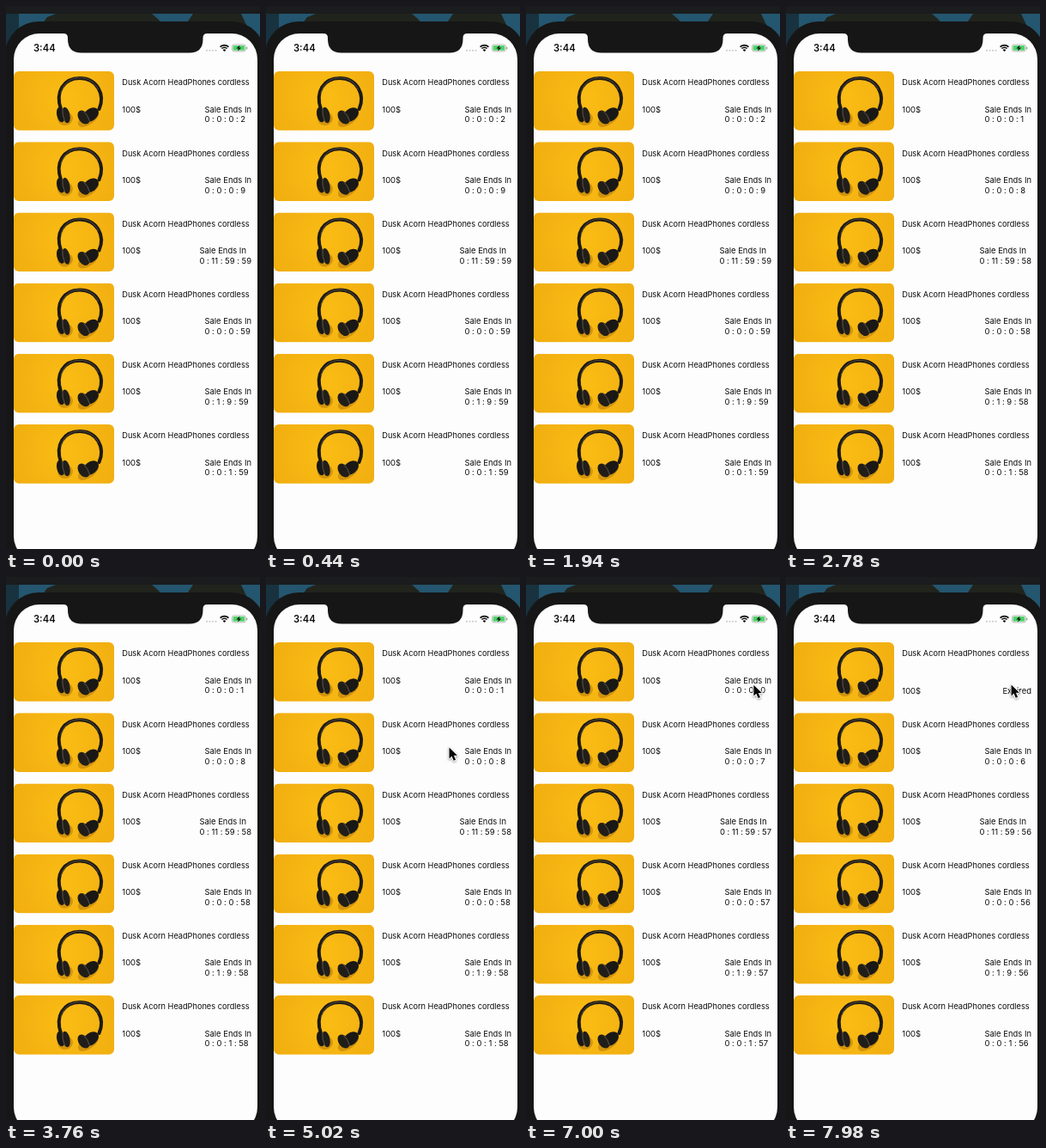
An HTML page with a canvas for the animation above (8 s loop, 296 px wide and 632 px high).

```html
<!DOCTYPE html>
<html lang="en">
<head>
<meta charset="utf-8">
<title>Sale countdown</title>
<style>
  html, body { margin: 0; width: 100%; height: 100%; overflow: hidden; background: #161616; }
  canvas { display: block; width: 296px; height: 632px; }
</style>
</head>
<body>
<canvas id="stage"></canvas>
<script>
const W = 296, H = 632, LOOP = 8000;
const FIRST_TICK = 2560, TICK = 2600;
const ROW_TOP = 76, ROW_STEP = 82.2, RIGHT = 286;
const INK = '#0c0c0c', BEZEL = '#161616', PAPER = '#fdfdfd';
const FAMILY = 'Inter, "Liberation Sans", sans-serif';
const TITLE_FONT = `9.2px ${FAMILY}`, FONT = `9.45px ${FAMILY}`;
const startSeconds = [2, 9, 11 * 3600 + 3599, 59, 4199, 119];

// Pointer path: time, x, y of the tip
const pointer = [
  [3820, -12, 300], [4080, 184, 233], [4480, 222, 205], [4800, 213, 198],
  [5060, 213, 198], [5400, 232, 179], [5760, 270, 137], [6000, 275, 129],
  [6300, 277, 127], [6640, 268, 126], [7100, 264, 125], [8000, 262, 125]
];

const canvas = document.getElementById('stage');
const ctx = canvas.getContext('2d');
const dpr = window.devicePixelRatio || 1;
canvas.width = W * dpr;
canvas.height = H * dpr;

function fillRect(x, y, w, h, color) {
  ctx.fillStyle = color;
  ctx.fillRect(x, y, w, h);
}

function fillRound(x, y, w, h, r, color) {
  ctx.beginPath();
  ctx.roundRect(x, y, w, h, r);
  ctx.fillStyle = color;
  ctx.fill();
}

function fillEllipse(x, y, rx, ry, degrees, color) {
  ctx.beginPath();
  ctx.ellipse(x, y, rx, ry, degrees * Math.PI / 180, 0, Math.PI * 2);
  ctx.fillStyle = color;
  ctx.fill();
}

function fillPath(d, color) {
  ctx.fillStyle = color;
  ctx.fill(new Path2D(d));
}

function strokePath(d, width, color) {
  ctx.lineWidth = width;
  ctx.strokeStyle = color;
  ctx.stroke(new Path2D(d));
}

function text(str, x, y, font = FONT) {
  ctx.font = font;
  ctx.fillStyle = INK;
  ctx.fillText(str, x, y);
}

function drawDesktop() {
  fillRect(0, 0, W, H, '#24566f');
  fillRect(0, 9, 15, 40, '#18323f');
  fillPath('M40 24 L48 13 L58 9 H170 L178 16 L184 24 Z', '#20241d');
  fillPath('M208 24 L218 9 H274 L281 24 Z', '#20241d');
  fillRect(0, 0, W, 9, '#1a1c1d');
}

function drawPhone() {
  fillRound(-1, 18, 303, 660, 39, BEZEL);
  fillRound(9, 32, 284, 615, 30, PAPER);
  fillPath('M67 31.5 V32 Q72 32 72 37 V38.5 Q72 54.5 88 54.5 H213.5 Q229.5 54.5 229.5 38.5 V37 Q229.5 32 234.5 32 V31.5 Z', BEZEL);
}

function drawStatus() {
  text('3:44', 32, 53, `600 11.2px ${FAMILY}`);
  for (let i = 0; i < 4; i++) fillEllipse(234 + i * 3.5, 51.8, 1, 1, 0, '#c8c8c8');

  ctx.lineCap = 'butt';
  ctx.strokeStyle = INK;
  ctx.lineWidth = 1.6;
  for (const r of [7, 4.4]) {
    ctx.beginPath();
    ctx.arc(254.5, 52.6, r, -Math.PI * 0.75, -Math.PI * 0.25);
    ctx.stroke();
  }
  ctx.beginPath();
  ctx.moveTo(254.5, 53);
  ctx.arc(254.5, 53, 2.6, -Math.PI * 0.75, -Math.PI * 0.25);
  ctx.fillStyle = INK;
  ctx.fill();

  ctx.beginPath();
  ctx.roundRect(263.4, 44.9, 16, 8, 2.4);
  ctx.lineWidth = 0.7;
  ctx.strokeStyle = '#9c9c9c';
  ctx.stroke();
  fillRound(264.5, 46, 13.8, 5.8, 1.4, '#4fd36a');
  fillRound(280.2, 47.4, 1.2, 3, 0.6, '#9c9c9c');
  fillPath('M272.6 45.4 L268.3 49.4 H271 L269.9 52.6 L274.3 48.4 H271.6 Z', INK);
}

function drawPhoto(y) {
  ctx.save();
  ctx.translate(9, y);
  ctx.beginPath();
  ctx.roundRect(0, 0, 117, 68.7, 6);
  ctx.clip();
  const glow = ctx.createRadialGradient(60, 32, 8, 60, 32, 72);
  glow.addColorStop(0, '#fabb14');
  glow.addColorStop(1, '#f0ad10');
  fillRect(0, 0, 117, 69, glow);

  fillEllipse(60, 55, 9, 8, -12, 'rgba(140,85,0,.35)');
  fillEllipse(87, 55, 14, 7, -35, 'rgba(140,85,0,.35)');
  ctx.lineCap = 'round';
  strokePath('M55 44 C48 24 58 8 77 8 C97 8 107 27 99.5 44', 4, '#1d1913');
  strokePath('M55 25 C58 14 66 7.6 77 7.6 C87 7.6 95 13 98.5 21', 0.9, '#5c5242');

  // left cup: shell and cushion
  fillEllipse(54.8, 50.5, 4.6, 9, -12, '#1a1815');
  fillEllipse(61, 51, 4.4, 9.5, -12, '#211e1a');
  strokePath('M56.8 43.5 Q56.2 51 59.4 58', 0.8, '#6a6356');

  // right cup
  fillEllipse(90, 50.5, 10, 7, -38, '#1a1815');
  fillEllipse(81.5, 53.5, 6, 8.8, -35, '#211e1a');
  strokePath('M81.5 46.5 Q86.5 51 88.5 58', 0.8, '#6a6356');
  ctx.restore();
}

function clock(s) {
  const parts = [Math.floor(s / 86400), Math.floor(s / 3600) % 24, Math.floor(s / 60) % 60, s % 60];
  return parts.join(' : ');
}

function drawRow(index, ticks) {
  const y = ROW_TOP + index * ROW_STEP;
  const left = startSeconds[index] - ticks;
  const lines = left < 0 ? ['Expired'] : ['Sale Ends In', clock(left)];
  const base = y + (left < 0 ? 59.5 : 47.5);

  drawPhoto(y);
  text('Dusk Acorn HeadPhones cordless', 135.3, y + 16.4, TITLE_FONT);
  text('100$', 135.3, base);
  const x = RIGHT - Math.max(...lines.map(line => ctx.measureText(line).width));
  lines.forEach((line, i) => text(line, x, base + i * 11.8));
}

function drawPointer(t) {
  const next = pointer.findIndex(p => p[0] > t);
  if (next < 1) return;
  const [t0, x0, y0] = pointer[next - 1];
  const [t1, x1, y1] = pointer[next];
  const k = (t - t0) / (t1 - t0);
  ctx.save();
  ctx.translate(x0 + (x1 - x0) * k, y0 + (y1 - y0) * k);
  const arrow = new Path2D('M0.5 0.5 V13.4 L3.5 10.6 L5.7 15.8 L8.1 14.8 L5.9 9.7 H10 Z');
  ctx.lineJoin = 'round';
  ctx.lineWidth = 2;
  ctx.strokeStyle = '#fff';
  ctx.shadowColor = 'rgba(0,0,0,.4)';
  ctx.shadowBlur = 2.5 * dpr;
  ctx.shadowOffsetY = dpr;
  ctx.stroke(arrow);
  ctx.shadowColor = 'transparent';
  ctx.fillStyle = '#060606';
  ctx.fill(arrow);
  ctx.restore();
}

function draw(t) {
  const ticks = t < FIRST_TICK ? 0 : 1 + Math.floor((t - FIRST_TICK) / TICK);
  ctx.setTransform(dpr, 0, 0, dpr, 0, 0);
  drawDesktop();
  drawPhone();
  drawStatus();
  startSeconds.forEach((_, i) => drawRow(i, ticks));
  drawPointer(t);
}

const start = performance.now();
function frame() {
  draw((performance.now() - start) % LOOP);
  requestAnimationFrame(frame);
}
frame();
</script>
</body>
</html>
```
